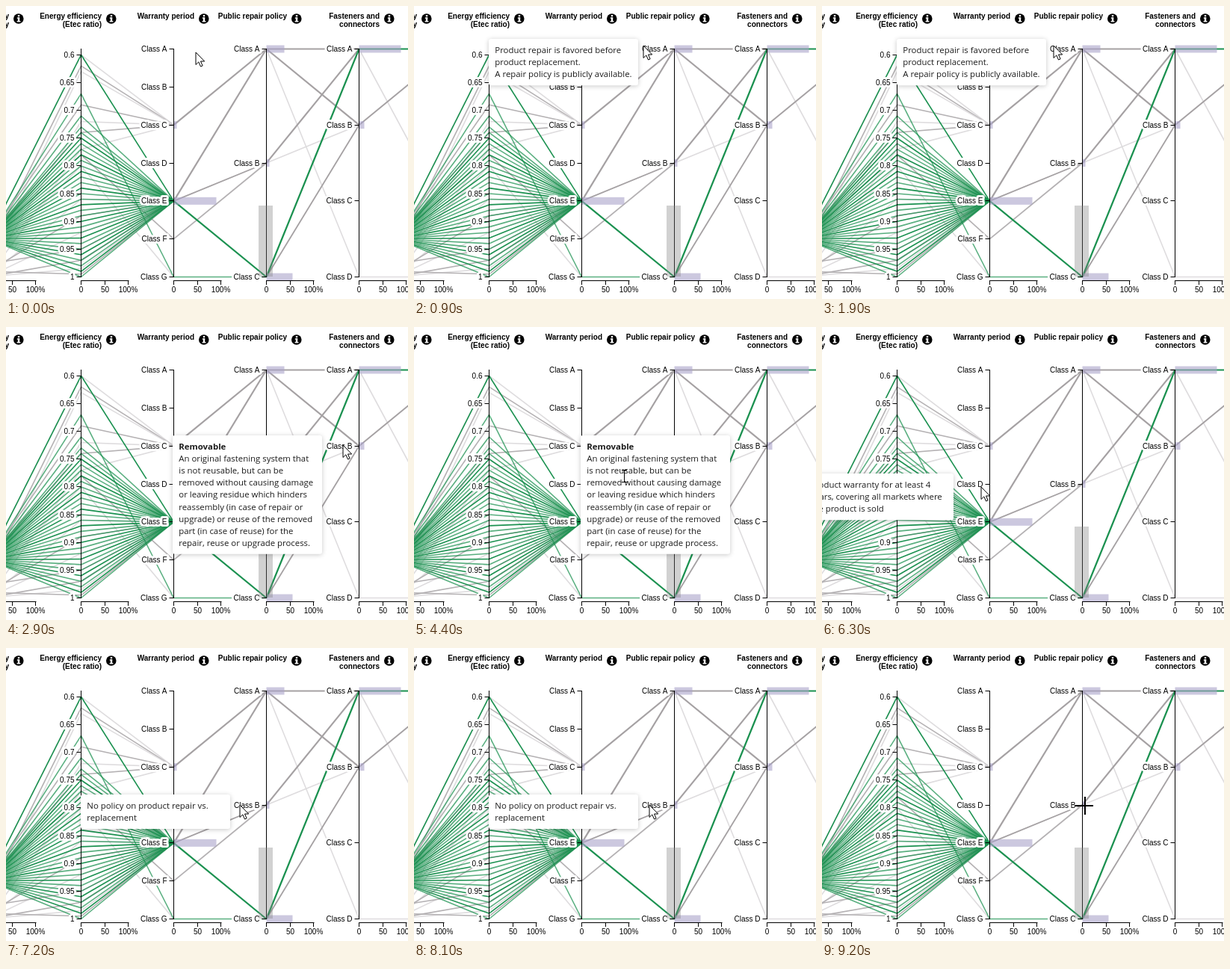
Recreate the animation shown at these times as an HTML page with a canvas. Size 538 px wide and 392 px high, loop 9.3 s.

```html
<!DOCTYPE html>
<html lang="en">
<head>
<meta charset="utf-8">
<title>Parallel coordinates</title>
<style>
html, body { margin: 0; width: 538px; height: 392px; overflow: hidden; background: #fff; }
canvas { display: block; }
</style>
</head>
<body>
<canvas id="stage" width="538" height="392"></canvas>
<script>
const W = 538, H = 392, LOOP = 9300, TOP = 57.5, BOTTOM = 362.5;
const LABEL = '10px "Liberation Sans", Arial, sans-serif';
const TIP = '11.4px "Open Sans", "Noto Sans", sans-serif';
const view = document.getElementById('stage').getContext('2d');

const axisX = i => -23.5 + 124 * i;
const level = (i, count) => TOP + (BOTTOM - TOP) * i / (count - 1);
const warranty = i => level(i, 7);
const repair = i => level(i, 3);
const fastener = i => level(i, 4);
const ratio = v => BOTTOM - (1 - v) * 743;
const classes = n => Array.from({ length: n }, (_, i) => ['Class ' + 'ABCDEFG'[i], level(i, n)]);

const axes = [
  { title: ['y', 'y'], ticks: [], bars: [] },
  { title: ['Energy efficiency', '(Etec ratio)'], bars: [],
    ticks: Array.from({ length: 9 }, (_, i) => [String(+(0.6 + i * 0.05).toFixed(2)), ratio(0.6 + i * 0.05)]) },
  { title: ['Warranty period'], ticks: classes(7), bars: [[2, 4], [4, 57]] },
  { title: ['Public repair policy'], ticks: classes(3), bars: [[0, 24], [1, 4], [2, 35]] },
  { title: ['Fasteners and', 'connectors'], ticks: classes(4), bars: [[0, 56], [1, 7]] }
];

function line(c, x1, y1, x2, y2, color, width = 1) {
  c.strokeStyle = color;
  c.lineWidth = width;
  c.beginPath();
  c.moveTo(x1, y1);
  c.lineTo(x2, y2);
  c.stroke();
}

function haloText(c, text, x, y) {
  c.lineJoin = 'round';
  c.strokeStyle = '#fff';
  c.lineWidth = 6;
  c.strokeText(text, x, y);
  c.fillStyle = '#000';
  c.fillText(text, x, y);
}

function drawLinks(c) {
  const link = (from, y1, y2, color, width = 1.6) =>
    line(c, axisX(from), y1, axisX(from + 1), y2, color, width);
  const green = '#1b9150', softGreen = 'rgba(27,145,80,.72)';
  const grey = '#a5a1a3', mid = '#b4b1b3', pale = '#dedcde';

  // Unselected: [ratio, left height, warranty class, colour]
  const others = [
    [0.6, 311, 2, pale], [0.62, 330, 2, mid], [0.63, 345, 2, pale],
    [0.69, 311, 2, mid], [0.72, 355, 2, pale], [0.74, 311, 2, mid],
    [0.77, 362, 2, pale], [0.78, 311, 5, mid], [0.8, 340, 6, pale],
    [0.86, 362, 4, pale], [0.89, 355, 4, mid], [0.92, 362, 4, pale],
    [0.95, 345, 4, mid], [0.97, 362, 4, mid], [0.985, 362, 4, pale], [0.995, 355, 4, mid]
  ];
  for (const [r, left, cls, color] of others) {
    link(0, left, ratio(r), color);
    link(1, ratio(r), warranty(cls), color);
  }
  link(3, repair(0), fastener(3), pale);
  link(3, repair(1), fastener(1), pale);
  link(4, fastener(0), 288, pale);
  link(4, fastener(3), BOTTOM, pale);
  link(2, warranty(5), repair(1), mid, 1.8);
  link(2, warranty(4), repair(1), grey, 1.8);
  link(2, warranty(4), repair(0), grey, 2.2);
  link(2, warranty(2), repair(0), grey, 2.2);
  link(3, repair(0), fastener(0), grey, 1.8);
  link(3, repair(0), fastener(1), grey, 2.2);
  link(3, repair(1), fastener(0), grey, 2);
  link(3, repair(2), fastener(1), grey, 1.8);
  link(4, fastener(1), TOP, grey, 2);

  // Selected
  const selected = [0.6, 0.71];
  for (let p = 73; p <= 100; p++) selected.push(p / 100);
  for (const r of selected) {
    const color = Math.round(r * 100) % 3 ? softGreen : green;
    link(0, 311.5, ratio(r), color);
    link(1, ratio(r), warranty(4), color);
  }
  link(0, 311.5, ratio(0.67), softGreen);
  link(1, ratio(0.67), warranty(6), softGreen);
  link(2, warranty(6), repair(2), softGreen);
  link(2, warranty(4), repair(2), green, 2.2);
  link(3, repair(2), fastener(0), green, 2.2);
  link(4, fastener(0), TOP, green, 2.2);
}

function drawInfo(c, x) {
  c.fillStyle = '#000';
  c.beginPath();
  c.arc(x, 17, 6.8, 0, 7);
  c.fill();
  c.fillStyle = '#fff';
  c.fillRect(x - 1, 12, 2.4, 2.2);
  c.fillRect(x - 2, 15.4, 3.4, 1.4);
  c.fillRect(x - 1, 15.4, 2.4, 5.4);
  c.fillRect(x - 2.2, 20, 4.8, 1.4);
}

function drawAxis(c, axis, i) {
  const x = axisX(i);
  c.fillStyle = 'rgba(170,163,202,.6)';
  for (const [k, width] of axis.bars) c.fillRect(x, axis.ticks[k][1] - 5, width, 10);

  line(c, x, TOP - 0.5, x, BOTTOM + 0.5, '#000');
  c.font = LABEL;
  c.textAlign = 'right';
  for (const [text, y] of axis.ticks) {
    const snapped = Math.floor(y) + 0.5;
    haloText(c, text, x - 9, snapped + 3.2);
    line(c, x - 6, snapped, x, snapped, '#000');
  }

  line(c, x - 0.5, 367.5, x + 64, 367.5, '#000');
  c.textAlign = 'center';
  c.fillStyle = '#000';
  ['0', '50', '100%'].forEach((text, k) => {
    const tx = x + [0, 32, 63][k];
    line(c, tx, 367, tx, 373, '#000');
    c.fillText(text, tx, 383);
  });

  c.font = 'bold ' + LABEL;
  c.textAlign = 'right';
  axis.title.forEach((text, k) => c.fillText(text, x + 27.5, 17 + 11 * k));
  drawInfo(c, x + 40.3);
}

function buildChart() {
  const canvas = document.createElement('canvas');
  canvas.width = W;
  canvas.height = H;
  const c = canvas.getContext('2d');
  c.fillStyle = '#fff';
  c.fillRect(0, 0, W, H);
  drawLinks(c);
  axes.forEach((axis, i) => drawAxis(c, axis, i));
  c.font = 'bold ' + LABEL;
  c.textAlign = 'left';
  c.fillText('N', 531, 17);
  c.fillStyle = 'rgba(128,128,128,.36)';
  c.fillRect(338, 267, 19, 95);
  return canvas;
}

const tips = [
  { from: 900, to: 2200, x: 100, base: 63, lines: [
    'Product repair is favored before', 'product replacement.',
    'A repair policy is publicly available.'] },
  { from: 2700, to: 4850, x: 223, base: 164, heading: true, lines: [
    'Removable', 'An original fastening system that', 'is not reusable, but can be',
    'removed without causing damage', 'or leaving residue which hinders',
    'reassembly (in case of repair or', 'upgrade) or reuse of the removed',
    'part (in case of reuse) for the', 'repair, reuse or upgrade process.'] },
  { from: 5150, to: 6400, x: -24, base: 215, lines: [
    'Product warranty for at least 4', 'years, covering all markets where',
    'the product is sold'] },
  { from: 6800, to: 8200, x: 100, base: 215, lines: [
    'No policy on product repair vs.', 'replacement'] }
];
for (const tip of tips) {
  tip.y = tip.base - 19;
  tip.h = 30 + 16.1 * (tip.lines.length - 1);
}

function drawTip(c, tip) {
  c.save();
  c.shadowColor = 'rgba(0,0,0,.22)';
  c.shadowBlur = 6;
  c.shadowOffsetY = 1;
  c.fillStyle = '#fff';
  c.beginPath();
  c.roundRect(tip.x, tip.y, 200, tip.h, 3);
  c.fill();
  c.restore();
  c.fillStyle = '#1c1c1c';
  c.textAlign = 'left';
  tip.lines.forEach((text, i) => {
    c.font = (tip.heading && i === 0 ? 'bold ' : '') + TIP;
    c.fillText(text, tip.x + 8.3, tip.base + 16.1 * i);
  });
}

// Pointer path: [time, x, y]
const path = [
  [0, 254, 62], [300, 254, 62], [1000, 310, 53], [2100, 310, 53],
  [2800, 451, 158], [3300, 451, 158], [4100, 281, 199], [4500, 281, 199],
  [5200, 207, 214], [6200, 207, 214], [6900, 313, 210], [8000, 313, 210],
  [8700, 351, 210], [LOOP, 351, 210]
];

function pointerAt(t) {
  const i = path.findIndex(p => p[0] > t);
  const [t0, x0, y0] = path[i - 1], [t1, x1, y1] = path[i];
  const u = (t - t0) / (t1 - t0), e = u * u * (3 - 2 * u);
  return [x0 + (x1 - x0) * e, y0 + (y1 - y0) * e];
}

function drawArrow(c) {
  const points = [[0, 0], [0, 16.5], [3.8, 12.9], [6.5, 19], [9.1, 17.9], [6.5, 12], [11.7, 12]];
  c.beginPath();
  for (const [x, y] of points) c.lineTo(x, y);
  c.closePath();
  c.fillStyle = '#fff';
  c.fill();
  c.strokeStyle = '#000';
  c.lineWidth = 1;
  c.stroke();
}

function drawBeam(c) {
  line(c, 0.5, -7, 0.5, 8, '#000');
  line(c, -3, -7.5, 4, -7.5, '#000');
  line(c, -3, 8.5, 4, 8.5, '#000');
}

function drawCross(c) {
  line(c, -12, 1, 12, 1, '#000', 2);
  line(c, 1, -11, 1, 13, '#000', 2);
}

function pointerShape(x, y, tip) {
  if (tip && x > tip.x && x < tip.x + 200 && y > tip.y && y < tip.y + tip.h) return drawBeam;
  const nearAxis = axes.some((_, i) => Math.abs(x - axisX(i)) < 10);
  return nearAxis && y > TOP && y < BOTTOM ? drawCross : drawArrow;
}

const chart = buildChart();

function frame(now) {
  const t = now % LOOP;
  view.drawImage(chart, 0, 0);
  const tip = tips.find(p => t >= p.from && t < p.to);
  if (tip) drawTip(view, tip);
  const [x, y] = pointerAt(t);
  view.save();
  view.translate(Math.round(x), Math.round(y));
  pointerShape(x, y, tip)(view);
  view.restore();
  requestAnimationFrame(frame);
}
requestAnimationFrame(frame);
</script>
</body>
</html>
```
